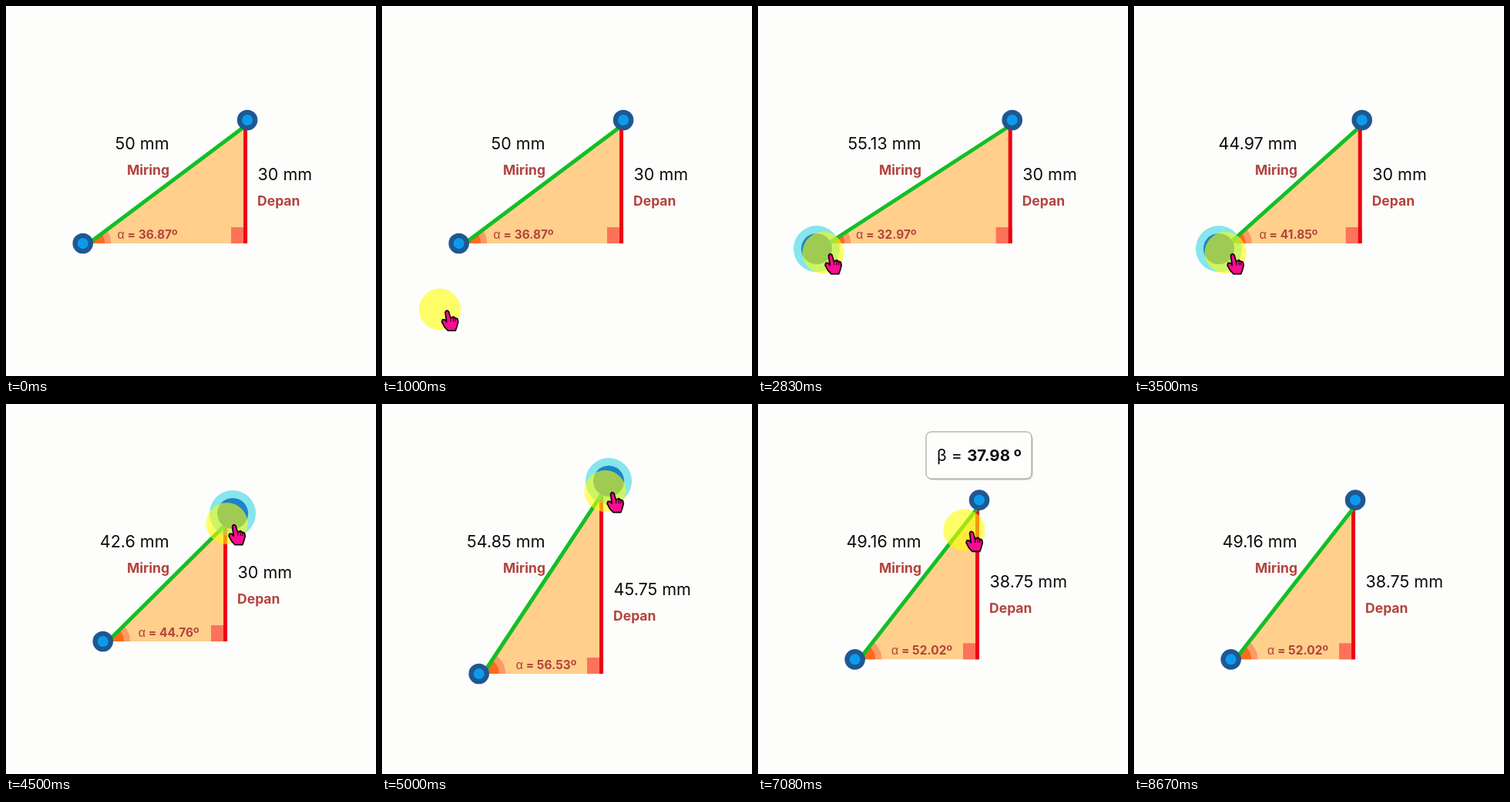
Recreate the animation shown at these times as an HTML page. Size 480 by 480 pixels, loop 9.01 s.

```html
<!DOCTYPE html>
<html lang="id">
<head>
<meta charset="utf-8">
<title>Segitiga siku-siku</title>
<style>
  html, body { margin: 0; width: 100%; height: 100%; overflow: hidden; background: #fdfdfc; }
  svg { display: block; width: 100%; height: 100%; }
  text { font: 400 21.5px Inter, sans-serif; fill: #0c0c0a; white-space: pre; }
  .name { font-weight: 700; font-size: 17.5px; fill: #b3433c; }
  .angle { font-weight: 700; font-size: 15.5px; fill: #b3433c; }
  .greek { font: 400 16px "Liberation Sans", sans-serif; }
  .end { text-anchor: end; }
  .bold { font-weight: 700; font-size: 20.5px; }
</style>
</head>
<body>
<svg viewBox="0 0 480 480">
  <defs>
    <g id="idle"><circle r="13.3" fill="#1e5892"/><circle r="7" fill="#0c9bec"/></g>
    <g id="held"><circle r="30" fill="#10cde0" fill-opacity=".5"/><circle r="20" fill="#1c84c4"/></g>
  </defs>

  <path id="fill" fill="#ffcf8b"/>
  <path id="arcOuter" fill="#fb9a68"/>
  <path id="arcInner" fill="#fb6c1c"/>
  <rect id="corner" width="21" height="21" fill="#fc725a"/>
  <path id="height" stroke="#ea0618" stroke-width="5"/>
  <path id="slope" stroke="#12bf26" stroke-width="5"/>

  <text id="slopeText" class="end" x="211.5" y="186"></text>
  <text class="name end" x="212" y="219">Miring</text>
  <text id="heightText"></text>
  <text id="heightName" class="name">Depan</text>
  <text id="angle" class="angle"><tspan class="greek">α</tspan><tspan id="angleText"></tspan></text>

  <use id="left"/>
  <use id="right"/>

  <g id="tip">
    <rect x="219" y="38" width="138" height="61" rx="8" opacity=".14"/>
    <rect x="218" y="36" width="137" height="61" rx="7" fill="#fefefd" stroke="#94948c"/>
    <text x="232" y="74"><tspan id="tipName"></tspan> = <tspan id="tipText" class="bold"></tspan></text>
  </g>

  <circle id="ring" cx="91" cy="308" fill="none" stroke="#b4d84e" stroke-opacity=".75" stroke-width="3"/>
  <g id="cursor">
    <circle cx="-10.5" cy="-2" r="27" fill="#ff0" fill-opacity=".58"/>
    <g transform="scale(.88 .95)" stroke="#160008">
      <path d="M-4 2Q-2-2 1 1L4 10 8 8 11 10 14 11 15 15 13 22 11 27H0L-5 22-9 15-8 12-5 12-2 15Z"
        fill="#ff0a93" stroke-width="2" stroke-linejoin="round"/>
      <path d="M4 10V15M8 9V15M11 11V15" stroke-width="1.3"/>
    </g>
  </g>
</svg>
<script>
const LOOP = 9010, STEP = 1000 / 12, SCALE = 8 / 3, CX = 206.4, CY = 228;

const $ = id => document.getElementById(id);
const set = (id, attrs) => {
  for (const key in attrs) $(id).setAttribute(key, attrs[key]);
};
const show = (id, on) => { $(id).style.display = on ? '' : 'none'; };
const between = (t, a, b) => t > a - 5 && t < b - 5;
const ramp = (t, a, b) => Math.min(1, Math.max(0, (t - a) / (b - a)));
const quarter = v => Math.round(v * 4) / 4;
const number = v => String(+v.toFixed(2));

// Side lengths in mm while the handles are dragged out and back.
const baseAt = t => quarter(40 + 8.75 * ramp(t, 1417, 1750) + 11.25 * ramp(t, 2000, 2250)
  - 13.75 * ramp(t, 2583, 2833) - 16 * ramp(t, 2833, 3667));
const heightAt = t => quarter(30 + 23.75 * ramp(t, 4500, 5250)
  - 15 * ramp(t, 5333, 6000) ** 0.78);

// The pointer glides from handle to handle and rides along with each drag.
function cursorAt(t, { left, right, top, bottom }) {
  let x = 70, y = 515;
  const glide = (toX, toY, from, to) => {
    const p = ramp(t, from, to);
    x += (toX - x) * p;
    y += (toY - y) * p;
  };
  const slip = ramp(t, 2250, 2833);
  glide(left - 3 + 15 * slip, bottom + 2 + 12 * slip, 417, 1417);
  glide(right + 10 + 6 * ramp(t, 4500, 5500), top + 9, 3667, 4333);
  glide(left + 17, bottom - 2, 6167, 6583);
  glide(right - 9, top + 41, 6750, 7083);
  glide(left + 17, bottom - 2, 7417, 7750);
  glide(-50, bottom, 7750, 8250);
  return [x, y];
}

function placeNode(id, x, y, dx, dy, held) {
  set(id, {
    href: held ? '#held' : '#idle',
    transform: `translate(${held ? x + dx : x} ${held ? y + dy : y})`
  });
}

function draw(t) {
  const base = baseAt(t), height = heightAt(t);
  const left = CX - base * SCALE, right = CX + base * SCALE;
  const top = CY - height * SCALE, bottom = CY + height * SCALE;
  const alpha = Math.atan2(height, base), degrees = alpha * 180 / Math.PI;

  // The sloping side runs slightly inside the line between the two handles.
  const x0 = left + 4.5 / Math.sin(alpha), x1 = right - 2.5;
  const y1 = bottom - (x1 - x0) * Math.tan(alpha);
  const sector = r => `M${x0} ${bottom}h${r}A${r} ${r} 0 0 0 ` +
    `${x0 + r * Math.cos(alpha)} ${bottom - r * Math.sin(alpha)}Z`;

  set('fill', { d: `M${x0} ${bottom}L${x1} ${y1}V${bottom}Z` });
  set('arcOuter', { d: sector(29) });
  set('arcInner', { d: sector(21) });
  set('corner', { x: right - 21, y: bottom - 21 });
  set('height', { d: `M${x1} ${y1 - 2}V${bottom}` });
  set('slope', { d: `M${x0} ${bottom}L${x1} ${y1}` });

  const labelY = 226 + (height - 30) * 1.4;
  $('slopeText').textContent = number(Math.hypot(base, height)) + ' mm';
  $('heightText').textContent = number(height) + ' mm';
  set('heightText', { x: right + 13.5, y: labelY });
  set('heightName', { x: right + 13, y: labelY + 33 });
  $('angleText').textContent = ` = ${number(degrees)}º`;
  set('angle', { x: left + 44 + (degrees - 31.6) * 0.16, y: bottom - 6.5 });

  placeNode('left', left, bottom, -7, 7, between(t, 1500, 3667));
  placeNode('right', right, top, 7, -6, between(t, 4333, 6083));

  const onBeta = t > 7050;
  show('tip', between(t, 6667, 7583));
  $('tipName').textContent = onBeta ? 'β' : 'α';
  $('tipText').textContent = number(onBeta ? 90 - degrees : degrees) + ' º';

  show('ring', between(t, 1500, 2083));
  set('ring', { r: 8 + 14 * ramp(t, 1500, 1750) });
  const [x, y] = cursorAt(t, { left, right, top, bottom });
  set('cursor', { transform: `translate(${x} ${y})` });
}

const start = performance.now();
function tick(now) {
  const t = Math.max(0, now - start) % LOOP;
  draw(Math.floor((t + 5) / STEP) * STEP);
  requestAnimationFrame(tick);
}
draw(0);
requestAnimationFrame(tick);
</script>
</body>
</html>
```
